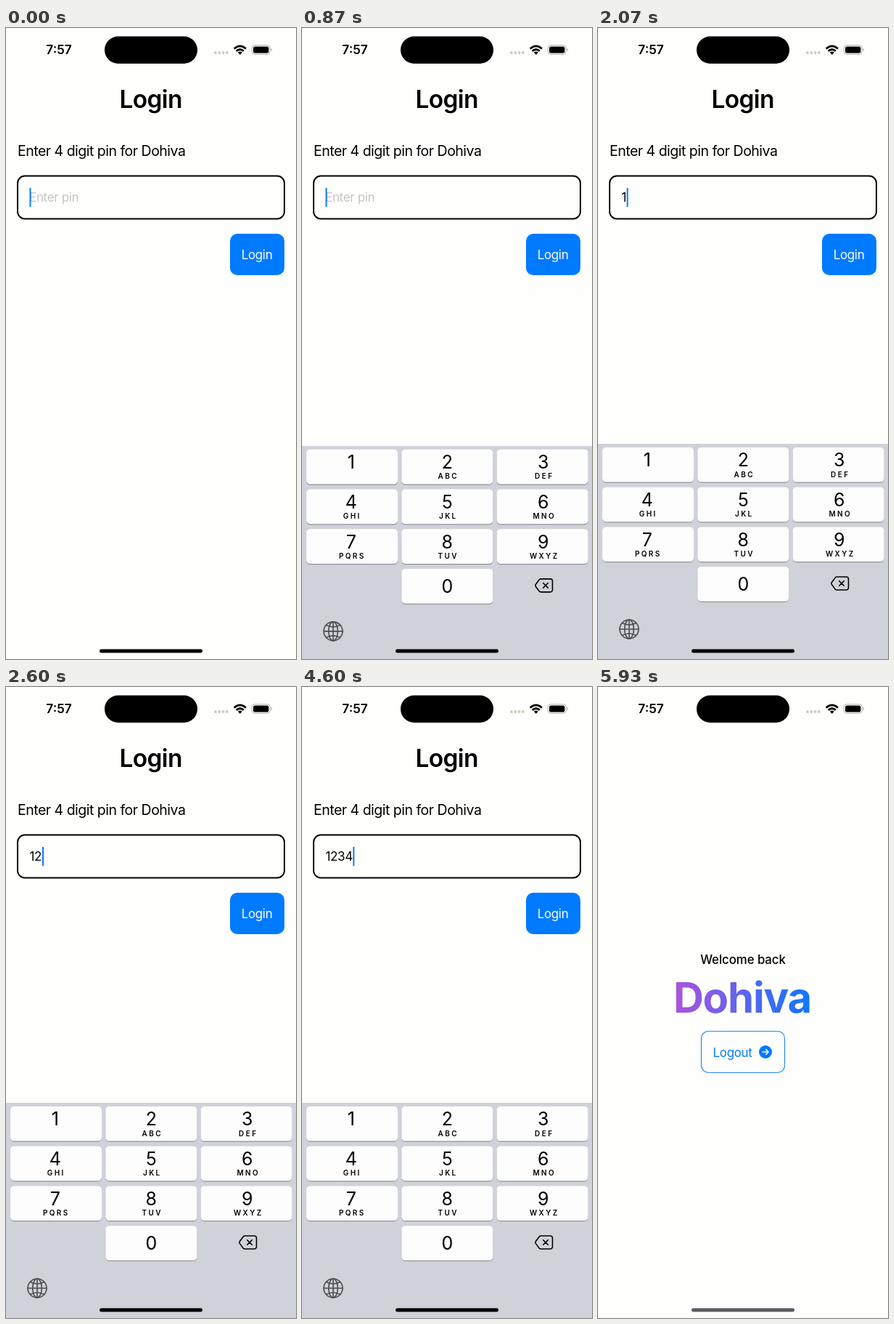
Animation of 400x868 px, one loop 8200 ms. Source, as an HTML page:

```html
<!DOCTYPE html>
<html lang="en">
<head>
<meta charset="utf-8">
<title>Pin login</title>
<style>
  html, body { margin: 0; width: 100%; height: 100%; overflow: hidden; background: #fefefc; }
  svg { display: block; width: 100%; height: 100%; }
  text { font: 17px Inter, "Liberation Sans", sans-serif; letter-spacing: -.02em; white-space: pre; }
  .mid { text-anchor: middle; }
  .line { fill: none; stroke-linecap: round; stroke-linejoin: round; }
  .digit { font-size: 25px; letter-spacing: 0; }
  .letters { font-size: 10px; font-weight: 600; letter-spacing: 2.4px; }
</style>
</head>
<body>
<svg viewBox="0 0 400 868">
  <defs>
    <linearGradient id="tint" gradientUnits="userSpaceOnUse" x1="102" x2="298">
      <stop offset="0" stop-color="#af52de"/>
      <stop offset="1" stop-color="#0b78ff"/>
    </linearGradient>
  </defs>

  <g id="login">
    <text class="mid" x="199.7" y="110" style="font-size:33.5px;font-weight:600">Login</text>
    <text x="16" y="176" style="font-size:19.5px;letter-spacing:-.026em">Enter 4 digit pin for Dohiva</text>
    <rect x="16" y="203.5" width="368" height="59" rx="10" fill="none" stroke="#000" stroke-width="2"/>
    <text id="hint" x="32" y="239.3" fill="#c6c6c4">Enter pin</text>
    <text id="pin" x="32.5" y="239.3"></text>
    <rect id="caret" y="220" width="2" height="26" fill="#0a7cf5"/>
    <rect x="309" y="283" width="75" height="57" rx="10" fill="#007aff"/>
    <text class="mid" x="346" y="318" fill="#fefefc">Login</text>
  </g>

  <g id="welcome">
    <text class="mid" x="200" y="381" style="font-size:16.8px;font-weight:500;letter-spacing:-.003em">Welcome back</text>
    <text class="mid" x="199" y="448" fill="url(#tint)" style="font-size:58px;font-weight:700">Dohiva</text>
    <rect x="142.5" y="473.5" width="115" height="57" rx="10" fill="none" stroke="#2388f5" stroke-width="1.2"/>
    <text x="158.5" y="508.5" fill="#0a7cf5" letter-spacing="-.027em">Logout</text>
    <circle cx="231" cy="502" r="9" fill="#007aff"/>
    <path class="line" d="M227 502h8m-3.3-3.4 3.4 3.4-3.4 3.4" stroke="#fefefc" stroke-width="1.5"/>
  </g>

  <g id="keyboard">
    <rect y="572" width="400" height="300" fill="#d0d2d9"/>
    <g id="keys"></g>
    <g class="line" stroke="#000" stroke-width="1.6">
      <path d="M329.5 755h13a3 3 0 0 1 3 3v12a3 3 0 0 1-3 3h-13q-1.3 0-2.2-.9l-4.8-6.5q-1.2-1.6 0-3.2l4.8-6.5q.9-.9 2.2-.9z"/>
      <path d="m332.7 760.7 6.6 6.6m0-6.6-6.6 6.6"/>
    </g>
    <g class="line" stroke="#4c4d50" stroke-width="1.6">
      <circle cx="43" cy="827" r="13"/>
      <ellipse cx="43" cy="827" rx="6.3" ry="13"/>
      <path d="M30 827h26m-13-13v26M33.5 818.5q9.5 5 19 0M33.5 835.5q9.5-5 19 0"/>
    </g>
  </g>

  <text class="mid" x="73" y="36" style="font-size:17.3px;font-weight:600;letter-spacing:0">7:57</text>
  <rect x="136" y="11.5" width="128" height="37.5" rx="18.7"/>
  <path class="line" d="M289 34h16" stroke="#cbcbbc" stroke-width="3.8" stroke-dasharray="0 5.3"/>
  <path class="line" d="M314.7 28.5q8.1-7.4 16.2 0M317.7 31.8q5.1-4.6 10.2 0" stroke="#000" stroke-width="2.7" style="stroke-linecap:butt"/>
  <path d="M322.8 36.8 319.9 33.8q2.9-2.4 5.8 0z"/>
  <rect x="339.2" y="23.8" width="25" height="12.4" rx="4" fill="none" stroke="#b0b0a4"/>
  <path d="M365.5 28v4q1.5-.5 1.5-2t-1.5-2z" fill="#b0b0a4"/>
  <rect x="341" y="25.5" width="21.4" height="9" rx="2.5"/>
  <rect id="home" x="129" y="854.5" width="142" height="5" rx="2.5"/>
</svg>

<script>
const $ = id => document.getElementById(id);
const TICK = 200 / 3, LOOP = 8200;   // the picture changes 15 times a second
const KEY = "#fdfdfd", PRESSED = "#b4b7be";
const KB_TRAVEL = 298, KB_UP = 7.5, KB_DOWN = 80.49, SWITCH = 81;

// All times below are in ticks.
const taps = [
  { down: 26, type: 28, up: 31 },
  { down: 34, type: 36, up: 39 },
  { down: 43, type: 47, up: 51 },
  { down: 53, type: 55, up: 59 }
];
const caretX = [32.5, 39.6, 50, 59.8, 70.3];
const blink = [[0, 1], [2, 0], [5, 0], [7, 1], [15, 1], [17, 0], [19, 0], [23, 1],
               [61, 1], [62, 0], [68, 0], [69, 1], [123, 1]];

const labels = ["", "ABC", "DEF", "GHI", "JKL", "MNO", "PQRS", "TUV", "WXYZ"];
const key = (digit, col, row, letters) => {
  const x = 6 + col * 131.3, y = 577 + row * 54.75, mid = 67.8 + col * 132.5;
  return `<rect x="${x}" y="${y + 1.2}" width="126" height="47.6" rx="5" fill="#929498"/>
    <rect id="key${digit}" x="${x}" y="${y}" width="126" height="47.6" rx="5" fill="${KEY}"/>
    <text class="mid digit" x="${mid}" y="${y + (digit ? 26.3 : 32.6)}">${digit}</text>
    <text class="mid letters" x="${mid + 1.5}" y="${y + 40.6}">${letters}</text>`;
};
$("keys").innerHTML =
  labels.map((s, i) => key(i + 1, i % 3, Math.floor(i / 3), s)).join("") + key(0, 1, 3, "");

function lerp(points, t) {
  const i = points.findIndex(p => p[0] > t);
  const [t0, v0] = points[i - 1], [t1, v1] = points[i];
  return v0 + (v1 - v0) * (t - t0) / (t1 - t0);
}

// Critically damped spring: distance still to go, from 1 to 0.
function spring(t) {
  const s = Math.max(0, t) * 1.217;
  return (1 + s) * Math.exp(-s);
}

function draw(n) {
  const inside = n >= SWITCH;
  $("login").style.display = inside ? "none" : "";
  $("welcome").style.display = inside ? "" : "none";

  const typed = taps.filter(tap => n >= tap.type).length;
  $("pin").textContent = "1234".slice(0, typed);
  $("hint").style.display = typed ? "none" : "";
  $("caret").setAttribute("x", caretX[typed]);
  $("caret").setAttribute("opacity", lerp(blink, n));
  taps.forEach((tap, i) =>
    $("key" + (i + 1)).setAttribute("fill", n >= tap.down && n < tap.up ? PRESSED : KEY));

  const hidden = inside ? 1 - spring(n - KB_DOWN) : spring(n - KB_UP);
  $("keyboard").setAttribute("transform", `translate(0 ${hidden * KB_TRAVEL})`);
  $("keyboard").style.display = hidden > .999 ? "none" : "";
  $("home").setAttribute("fill", inside ? "#5c5b60" : "#000");
}

let start;
function frame(now) {
  start ??= now;
  draw(Math.floor(((now - start) % LOOP + 4) / TICK) % 123);
  requestAnimationFrame(frame);
}
draw(0);
requestAnimationFrame(frame);
</script>
</body>
</html>
```
